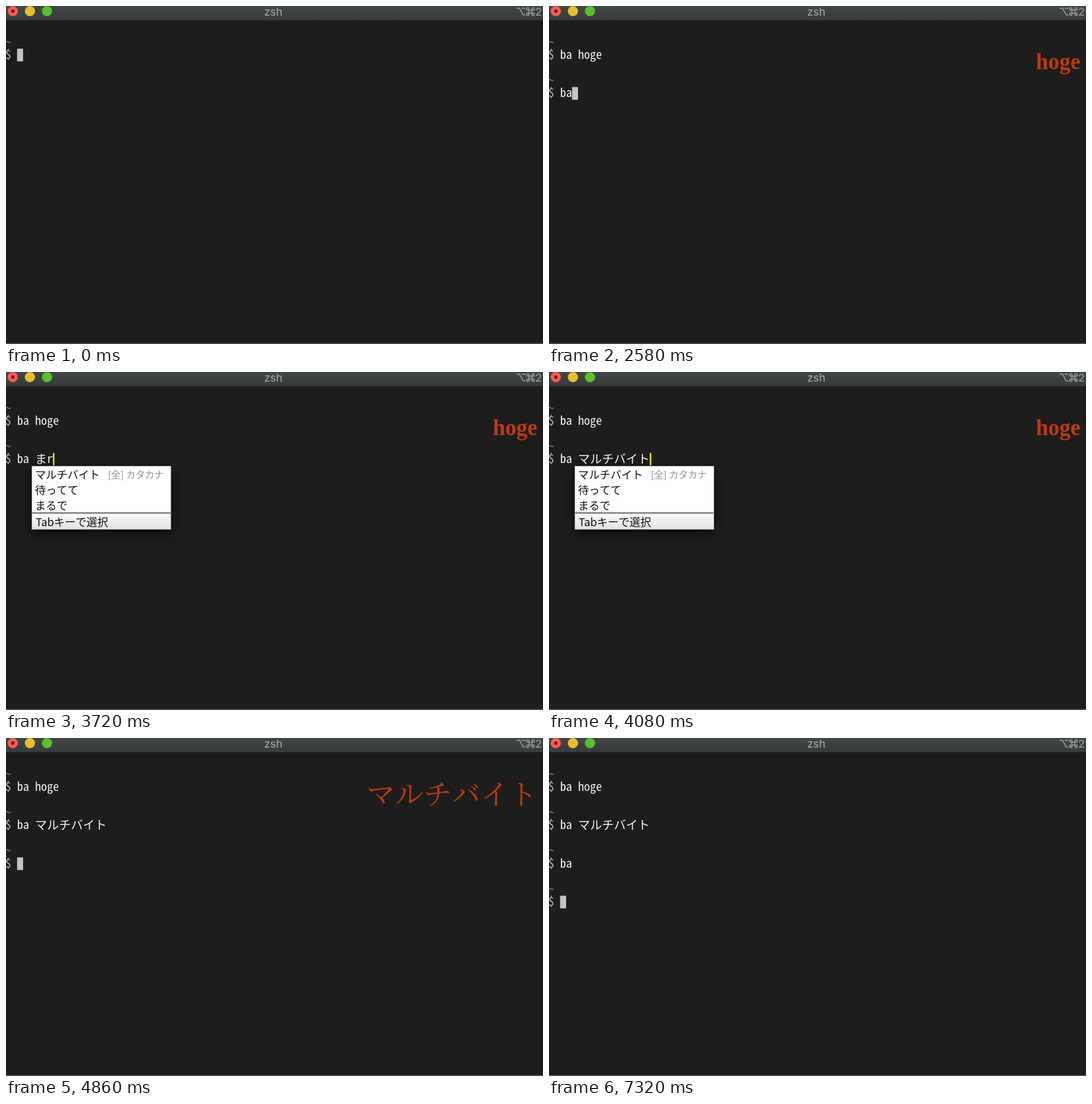
An HTML page with a canvas that plays this animation: 943x594 px, repeating every 7380 ms.

```html
<!DOCTYPE html>
<html lang="ja">
<head>
<meta charset="utf-8">
<title>zsh</title>
<style>
html, body { margin: 0; width: 100%; height: 100%; overflow: hidden; background: #1d1d1d; }
canvas { display: block; }
</style>
</head>
<body>
<canvas id="stage" width="943" height="594"></canvas>
<script>
const W = 943, H = 594, LOOP = 7380;
const CELL = 10.5, LEFT = 19.5, STEP = 67.4;
const SANS = '"Noto Sans CJK JP", "Noto Sans CJK", sans-serif';
const MONO = '"Noto Sans Mono CJK JP", "Noto Sans Mono", monospace';
const MINCHO = '"Noto Serif CJK JP", "Noto Sans CJK JP", serif';
const KANA = 'マルチバイト';
const ctx = document.getElementById('stage').getContext('2d');

// Each entry: start time, text of the current prompt line
const typing = [
  { from: 0, keys: [[840, 'b'], [960, 'ba'], [1080, 'ba '], [1200, 'ba h'], [1320, 'ba ho'], [1440, 'ba hog'], [1560, 'ba hoge']] },
  { from: 1680, keys: [[2400, 'b'], [2520, 'ba'], [2760, 'ba '], [4320, 'ba ' + KANA]] },
  { from: 4800, keys: [[5760, 'b'], [5880, 'ba']] },
  { from: 6300, keys: [] }
];
const composing = [[3360, 'm'], [3540, 'ま'], [3660, 'まr'], [3960, KANA], [4260, '']];
const badges = [[1740, 'hoge'], [4860, KANA], [6360, '']];

const at = (list, t) => list.reduce((v, [start, s]) => t >= start ? s : v, '');
const wide = ch => ch > '\u2fff';
const cols = s => [...s].reduce((n, ch) => n + (wide(ch) ? 2 : 1), 0);

ctx.font = '21px ' + MONO;
const latinSize = 21 * CELL / ctx.measureText('a').width;

function rect(x, y, w, h, fill) {
  ctx.fillStyle = fill;
  ctx.fillRect(x, y, w, h);
}

function disc(x, y, r, fill) {
  ctx.fillStyle = fill;
  ctx.beginPath();
  ctx.arc(x, y, r, 0, Math.PI * 2);
  ctx.fill();
}

function text(s, x, y, font, fill, align = 'left') {
  ctx.font = font;
  ctx.fillStyle = fill;
  ctx.textAlign = align;
  ctx.fillText(s, x, y);
}

function cells(s, x, y, fill) {
  for (const ch of s) {
    const w = cols(ch) * CELL;
    const font = wide(ch) ? '21px ' + SANS : latinSize + 'px ' + MONO;
    text(ch, x + w / 2, y, font, fill, 'center');
    x += w;
  }
}

function fade(y0, y1, top, bottom) {
  const g = ctx.createLinearGradient(0, y0, 0, y1);
  g.addColorStop(0, top);
  g.addColorStop(1, bottom);
  return g;
}

function shortcut() {
  ctx.strokeStyle = '#929594';
  ctx.lineWidth = 1.9;
  ctx.beginPath();
  ctx.moveTo(896.5, 4);
  ctx.lineTo(902, 4);
  ctx.lineTo(908, 15.5);
  ctx.lineTo(912, 15.5);
  ctx.moveTo(905.5, 4);
  ctx.lineTo(912, 4);
  ctx.stroke();
  ctx.strokeRect(918.3, 7.3, 5.2, 5.2);
  for (const sx of [-1, 1]) for (const sy of [-1, 1]) {
    ctx.beginPath();
    ctx.arc(920.9 + sx * 4.7, 9.9 + sy * 4.7, 2.1, 0, Math.PI * 2);
    ctx.stroke();
  }
  text('2', 941, 16.5, '500 19px Inter, sans-serif', '#929594', 'right');
}

function frame() {
  rect(0, 0, W, H, '#1d1d1d');
  rect(0, 0, W, 25, fade(0, 25, '#434847', '#363a39'));
  rect(0, 592.5, W, 1.5, '#5a5659');
  disc(12, 9, 9, '#fc5a54');
  disc(12, 9, 3, '#7d0906');
  disc(42, 9, 9, '#e6bf2c');
  disc(72, 9, 9, '#53c22c');
  text('zsh', 469.5, 16.5, '19px Inter, sans-serif', '#a9acab', 'center');
  shortcut();
}

function badge(s) {
  const color = '#c0390e';
  if (s === 'hoge') {
    text(s, 933, 111, 'bold 39px "Liberation Serif", serif', color, 'right');
  } else if (s) {
    text(s, 633, 117, '500 50px ' + MINCHO, color);
  }
}

function popup() {
  ctx.save();
  ctx.shadowColor = 'rgba(0,0,0,.65)';
  ctx.shadowBlur = 18;
  ctx.shadowOffsetY = 6;
  rect(45, 165, 245, 112, '#a5a5a5');
  ctx.restore();
  rect(46, 166, 243, 110, '#fff');
  rect(46, 248, 243, 28, fade(248, 276, '#fbfbfb', '#e2e2e2'));
  rect(46, 247, 243, 1.4, '#2b2020');
  const font = '19px ' + SANS;
  [KANA, '待ってて', 'まるで'].forEach((s, i) => text(s, 51, 188 + i * 27, font, '#111'));
  text('[全]', 179, 187, '16.5px ' + SANS, '#929292');
  text('カタカナ', 211, 187, '16.5px ' + SANS, '#929292');
  text('Tabキーで選択', 52, 271, font, '#111');
}

function draw(t) {
  frame();
  badge(at(badges, t));
  const lines = typing.filter(l => t >= l.from);
  lines.forEach((line, i) => {
    const y = 93 + i * STEP;
    const s = at(line.keys, t);
    cells('~', LEFT - 2 * CELL, y - 22.5, '#4f9f96');
    cells('$', LEFT - 2 * CELL, y, '#b4b4b4');
    cells(s, LEFT, y, '#f6f6f6');
    if (i < lines.length - 1) return;
    const x = LEFT + cols(s) * CELL;
    const draft = at(composing, t);
    if (draft && i === 1) {
      cells(draft, x, y, '#f6f6f6');
      rect(x + cols(draft) * CELL, y - 18, 2.5, 22, '#fdf300');
    } else {
      rect(x, y - 18, CELL, 22.3, '#c3c3c3');
    }
  });
  if (t >= 3660 && t < 4200) popup();
}

function tick(now) {
  draw(now % LOOP);
  requestAnimationFrame(tick);
}
draw(0);
requestAnimationFrame(tick);
</script>
</body>
</html>
```
